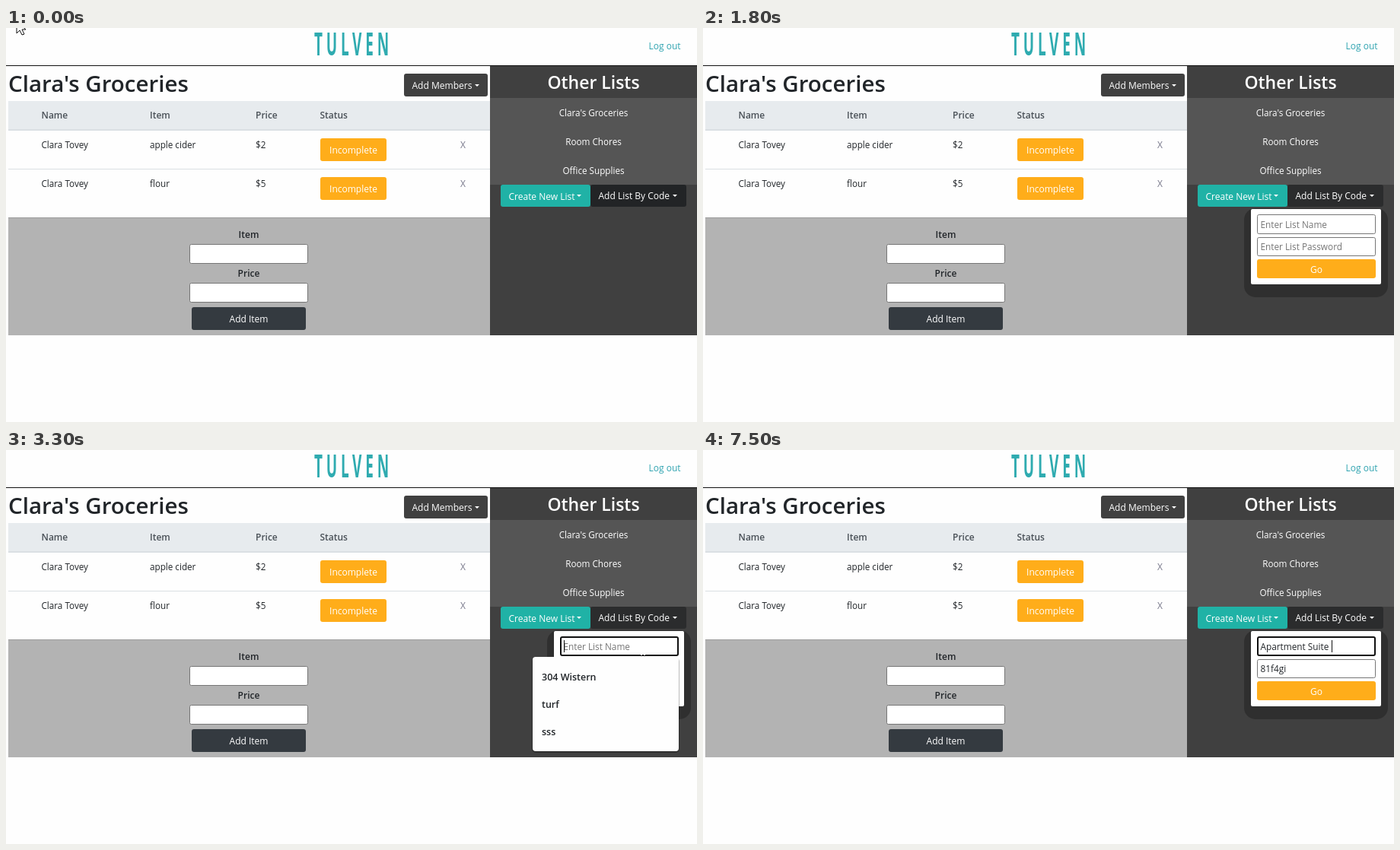
An HTML page for the animation above (8 s loop, 908 px wide and 518 px high).

```html
<!DOCTYPE html>
<html lang="en">
<head>
<meta charset="utf-8">
<title>Shared shopping lists</title>
<style>
html, body { margin: 0; width: 100%; height: 100%; overflow: hidden; background: #fefefe; }
svg { display: block; width: 908px; height: 518px; font: 12px "Open Sans", "Noto Sans", sans-serif; }
text { white-space: pre; }
.logo { font-size: 19px; font-weight: 700; letter-spacing: 4.8px; }
.title { font-size: 29.5px; font-weight: 600; }
.side { font-size: 23px; font-weight: 600; }
.bold { font-weight: 600; }
.small { font-size: 11.7px; }
.field { font-size: 11.8px; }
.option { font-size: 12.5px; font-weight: 600; }
.mark { font: 9px "DejaVu Sans", sans-serif; stroke: #212529; stroke-width: .4px; }
.mid { text-anchor: middle; }
</style>
</head>
<body>
<svg id="stage" viewBox="0 0 908 518" xmlns="http://www.w3.org/2000/svg"></svg>
<script>
const stage = document.getElementById('stage');
const INK = '#212529', AMBER = '#ffad1a', TEAL = '#20b2a6';
const OWNER = 'Clara', LIST = OWNER + "'s Groceries";

const escape = s => s.replace(/&/g, '&amp;').replace(/</g, '&lt;');
const rect = (x, y, w, h, fill, r = 0, extra = '') =>
  `<rect x="${x}" y="${y}" width="${w}" height="${h}" rx="${r}" fill="${fill}" ${extra}/>`;
const text = (x, y, s, cls = '', fill = INK, extra = '') =>
  `<text x="${x}" y="${y}" class="${cls}" fill="${fill}" ${extra}>${escape(s)}</text>`;
const button = (x, y, w, h, fill, label, labelX) =>
  rect(x, y, w, h, fill, 3) + (labelX ? text(labelX, y + h / 2 + 5, label, '', '#fff')
    : text(x + w / 2, y + h / 2 + 5, label, 'mid', '#fff'));
const arrowDown = (x, y) => `<path d="M${x} ${y}h6l-3 3z" fill="#fff"/>`;
const box = (x, y, w, h, focus) => focus
  ? rect(x + 1, y + 1, w - 2, h - 2, '#fff', 2, 'stroke="#101010" stroke-width="2"')
  : rect(x + .5, y + .5, w - 1, h - 1, '#fff', 2, 'stroke="#767676"');

function pane() {
  const row = (y, item, price) =>
    text(46.5, y + 13, OWNER + ' Tovey', 'small') + text(189, y + 13, item, 'small') +
    text(328, y + 13, price, 'small') + button(413, y, 87, 30, AMBER, 'Incomplete') +
    text(597, y + 13, 'X', '', '#77778a');
  const heads = [[46.5, 'Name'], [189, 'Item'], [328, 'Price'], [412.5, 'Status']];
  return text(405, 0, 'TULVEN', 'logo', '#2fabb0', 'transform="translate(0 36) scale(1 2.2)"') +
    text(844.5, 28, 'Log out', '', '#2fa3b0') +
    rect(0, 49, 908, 1, '#111') +
    text(3, 84, LIST, 'title') +
    rect(3, 96, 633, 38, '#e7ebee') + rect(3, 133, 633, 2, '#dadfe3') +
    heads.map(([x, s]) => text(x, 119, s, 'bold', '#495057')).join('') +
    row(145, 'apple cider', '$2') + rect(3, 185, 633, 1, '#dadfe3') + row(196, 'flour', '$5') +
    rect(3, 249, 633, 155, '#b3b3b3') + rect(3, 249, 633, 1, '#9c9c9c') +
    text(319, 276, 'Item', 'bold mid') + box(241, 284, 156, 26) +
    text(319, 327, 'Price', 'bold mid') + box(241, 335, 156, 26) +
    button(244, 367, 150, 30, '#343a40', 'Add Item');
}

function sidebar(t) {
  const flat = t >= 2100 && t < 2400;
  const pressed = t >= 1100 && t < 1400;
  const dark = flat ? '#4b4b4b' : '#404040';
  return button(523, 60, 110, 30, dark, 'Add Members', 533.5) + arrowDown(616, 74) +
    rect(636, 50, 272, 354, dark) + rect(636, 92, 272, 114, flat ? dark : '#555') +
    text(772, 80, 'Other Lists', 'side mid', '#fff') +
    [LIST, 'Room Chores', 'Office Supplies']
      .map((s, i) => text(772, 116 + 38 * i, s, 'small mid', '#fff')).join('') +
    button(650, 206, 118, 29, TEAL, 'Create New List', 660.5) + arrowDown(750, 219) +
    rect(768, 206, 126, 29, t < 1100 ? '#222426' : '#2b2c2d', 3,
      pressed || flat ? 'stroke="#2d4260"' : '') +
    (pressed ? rect(769.5, 207.5, 123, 26, '#101010', 3, 'stroke="#fff"') +
      rect(772, 210, 118, 21, '#2b2c2d') : '') +
    text(778.5, 225, 'Add List By Code', '', '#fff') + arrowDown(876, 219);
}

// Each entry adds one character to the list name.
const NAME = 'Apartment Suite ';
const KEYS = [3500, 4200, 4300, 4500, 4700, 4900, 5000, 5100, 5200,
  5700, 6200, 6500, 6900, 7000, 7200, 7500];

function menu(t) {
  if (t < 1400) return '';
  const flat = t >= 2100 && t < 2400;
  const focusName = t >= 2700, focusCode = t >= 2100 && !focusName;
  const typed = NAME.slice(0, KEYS.filter(k => k <= t).length);
  const code = t >= 2300 ? '81f4gi' : '';
  const field = (y, value, hint, id) =>
    text(732.5, y, value || hint, 'field', value ? INK : '#757575', `id="${id}"`);
  return (flat ? rect(706, 237, 199, 122, '#433e3e', 18) : '') +
    rect(711, 237, 189, 117, '#2f2f2f', 15) + rect(720, 238, 171, 99, '#fff', 2) +
    box(728, 245, 156, 26, focusName) + field(263, typed, 'Enter List Name', 'name') +
    box(728, 275, 156, 25, focusCode) + field(292, code, 'Enter List Password', 'code') +
    button(728, 304, 156, 25, AMBER, 'Go') +
    (t >= 2900 && t < 3500 ? rect(834, 268, 2, 2, '#fff') + rect(838, 268, 2, 2, '#fff') : '');
}

function options(t) {
  const panel = (x, y, w, h) =>
    rect(x - 1, y + 1, w + 2, h + 1, '#0004', 5) + rect(x, y, w, h, '#fefefe', 4);
  const lines = (x, y, list) =>
    list.map((s, i) => text(x, y + 36 * i, s, 'option')).join('');
  if (t >= 2100 && t < 2300) {
    const tabs = '\u2409'.repeat(6);
    return panel(428, 301, 456, 160) +
      lines(440, 332, ['rd92zy', 'm2ucse', '<div className="latest-single">', 'sfdsfs']) +
      text(638, 403, tabs, 'mark') + text(685, 404, '<h1>{currentList}</h1>', 'option') +
      text(827, 403, tabs, 'mark');
  }
  if (t >= 3300 && t < 3500)
    return panel(692, 272, 192, 124) + lines(704, 303, ['304 Wistern', 'turf', 'sss']);
  return '';
}

function textCaret(t) {
  if (t < 2100 || (t >= 4000 && t < 4200)) return '';
  const onName = t >= 2700;
  const filled = onName ? t >= KEYS[0] : t >= 2300;
  const el = document.getElementById(onName ? 'name' : 'code');
  const x = 733 + (filled ? Math.round(el.getComputedTextLength()) : 0);
  return rect(x, onName ? 250 : 280, 1, 16, '#111');
}

function pointer(t) {
  if (t >= 1600) return '';
  const arrow = 'M0 0V16L4 12L7 18L10 17L7 11H12Z';
  const hand = 'M0 2Q2-1 4 2V9Q6 7 7 10Q9 8 10 11Q12 10 12 13V18L10 23H2L-4 15Q-4 12-1 13L0 14Z';
  const u = Math.max(0, Math.min(1, (t - 100) / 900)), v = 1 - u;
  const bezier = (a, b, c, d) => v * v * v * a + 3 * v * v * u * b + 3 * v * u * u * c + u * u * u * d;
  let x = bezier(14, 200, 800, 785), y = bezier(-9, 200, 430, 223);
  if (t >= 1500) { x = 800; y = 255; }
  const over = u === 1 && t < 1500;
  return `<path transform="translate(${x} ${y})" d="${over ? hand : arrow}"
    fill="#fff" stroke="#111" stroke-linejoin="round"/>`;
}

const fixed = pane();
let last = -1;
function frame(now) {
  const t = Math.floor(now % 8000 / 100) * 100;
  if (t !== last) {
    last = t;
    stage.innerHTML = fixed + sidebar(t) + menu(t) + options(t);
    stage.insertAdjacentHTML('beforeend', textCaret(t) + pointer(t));
  }
  requestAnimationFrame(() => frame(performance.now() - start));
}
const start = performance.now();
frame(0);
</script>
</body>
</html>
```
